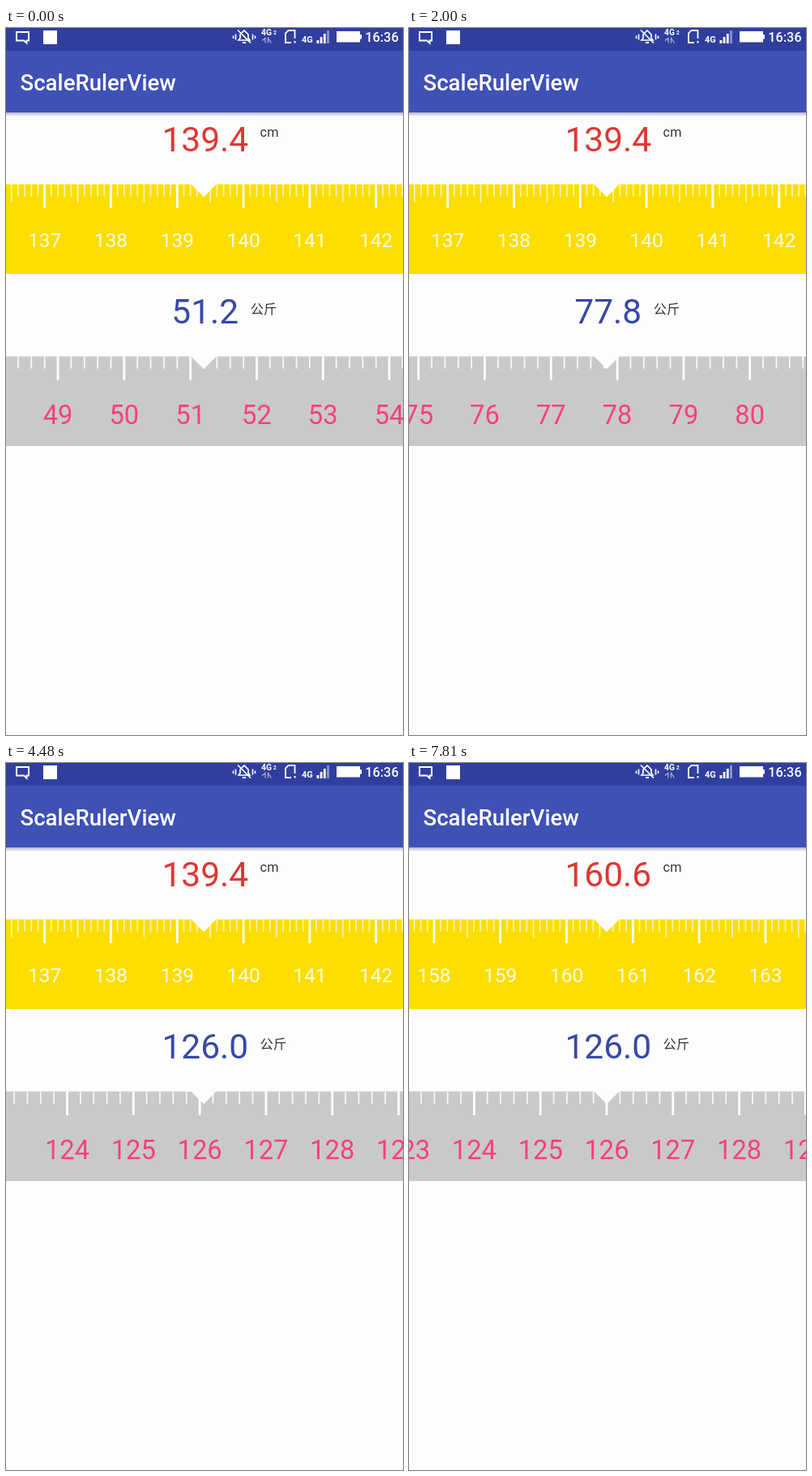
Recreate the animation shown at these times as an HTML page with a canvas. Size 490x871 px, loop 8.09 s.

```html
<!DOCTYPE html>
<html lang="en">
<head>
<meta charset="utf-8">
<title>Scale rulers</title>
<style>
html, body { margin: 0; width: 100%; height: 100%; overflow: hidden; background: #fdfdfd; }
canvas { display: block; width: 490px; height: 871px; }
</style>
</head>
<body>
<canvas id="stage" width="490" height="871"></canvas>
<script>
const ctx = document.getElementById('stage').getContext('2d');
const W = 490, H = 871, LOOP = 8090, REFRESH = 134;
const CENTER = 244, UNIT = 81.8, FLING = 650;
const FONT = 'Roboto, "Noto Sans CJK SC", "Noto Sans CJK", sans-serif';
const WHITE = '#fff', PAPER = '#fdfdfd';

// Flings are [start in ms, distance in units]
const heightRuler = {
  top: 192.6, fill: '#fbde00', tick: '#fef5b4', color: '#fffce0', size: 24.5, base: 269.6,
  parts: 10, mid: 5, valueColor: '#e03632', valueBase: 151.6, unit: 'cm', unitBase: 133.5,
  start: 139.4, flings: [[4640, 4.1], [4960, 17.105]]
};
const weightRuler = {
  top: 404.6, fill: '#c9c9c9', tick: '#f9f9f9', color: '#f8407c', size: 32.7, base: 488.2,
  parts: 5, mid: 0, valueColor: '#3848a6', valueBase: 363.7, unit: '公斤', unitBase: 352,
  start: 51.2, flings: [[300, 10.6], [560, 16.04], [1880, 16], [2790, 15.95], [3740, 16.27], [4750, -0.06]]
};

const clamp = p => Math.min(1, Math.max(0, p));
const easeOut = p => 1 - Math.pow(1 - clamp(p), 2.2);

function valueAt(t, r) {
  return r.flings.reduce((v, [begin, dist]) => v + dist * easeOut((t - begin) / FLING), r.start);
}

function rect(x, y, w, h, color) {
  ctx.fillStyle = color;
  ctx.fillRect(x, y, w, h);
}

function text(str, x, y, size, color, align = 'left', weight = 400) {
  ctx.font = `${weight} ${size}px ${FONT}`;
  ctx.textAlign = align;
  ctx.fillStyle = color;
  ctx.fillText(str, x, y);
}

function path(points, close) {
  ctx.beginPath();
  points.forEach(([x, y]) => ctx.lineTo(x, y));
  if (close) ctx.closePath();
}

function line(points, width, color = WHITE, close = false) {
  path(points, close);
  ctx.lineWidth = width;
  ctx.strokeStyle = color;
  ctx.stroke();
}

function fill(points, color) {
  path(points, true);
  ctx.fillStyle = color;
  ctx.fill();
}

function drawRuler(r, t) {
  const value = valueAt(t, r);
  rect(0, r.top, W, 110.4, r.fill);
  const first = Math.floor((value - CENTER / UNIT) * r.parts) - 1;
  const last = first + Math.ceil(W / UNIT * r.parts) + 3;
  for (let k = first; k <= last; k++) {
    const x = CENTER + (k / r.parts - value) * UNIT;
    const major = k % r.parts === 0;
    const len = major ? 29.4 : r.mid && k % r.mid === 0 ? 22 : 15;
    const w = major ? 2.8 : 1.7;
    rect(x - w / 2, r.top, w, len, major ? WHITE : r.tick);
    if (major && x > -3 && x < W + 1) text(k / r.parts, x, r.base, r.size, r.color, 'center');
  }
  fill([[CENTER - 16.5, r.top - 1], [CENTER + 16.5, r.top - 1], [CENTER, r.top + 15.7]], PAPER);

  const label = (Math.round(value * r.parts) / r.parts).toFixed(1);
  text(label, 245.75, r.valueBase, 42.5, r.valueColor, 'center');
  const end = 245.75 + ctx.measureText(label).width / 2;
  text(r.unit, end + 14.5, r.unitBase, 16.3, '#333');
}

function drawStatusBar() {
  rect(0, 0, W, 28, '#303f9f');

  line([[13, 5], [28, 5], [28, 15.5], [25.5, 15.5], [25.5, 18.5], [22, 15.5], [13, 15.5]], 2, WHITE, true);
  rect(46, 3, 17, 17, WHITE);

  // Muted bell
  line([[287, 15], [289, 12.5], [289, 8], [294, 3], [299, 8], [299, 12.5], [301, 15]], 1.7, WHITE, true);
  line([[286, 2.5], [302, 18.5]], 1.7);
  line([[292, 18], [296, 18]], 2);
  for (const side of [-1, 1]) {
    rect(293.2 + side * 10.5, 7.5, 1.6, 7, WHITE);
    rect(293.2 + side * 13.5, 9.5, 1.6, 3.5, WHITE);
  }

  // Network and data arrows
  text('4G', 315, 9, 10.3, WHITE, 'left', 700);
  text('2', 330, 8, 6.5, WHITE, 'left', 700);
  const dim = 'rgba(255,255,255,.6)';
  line([[316, 15.5], [320, 12.5], [320, 18.5]], 1.2, dim);
  line([[323.5, 18.5], [323.5, 12.5], [327.5, 18.5]], 1.2, dim);

  // SIM card, signal, battery
  line([[352, 18], [345, 18], [345, 6.5], [348.5, 3], [356.5, 3], [356.5, 13]], 1.8);
  rect(355.5, 16, 2, 2.5, WHITE);
  text('4G', 365, 18, 11, WHITE, 'left', 700);
  for (let i = 0; i < 4; i++) {
    const h = 4 + i * 4;
    rect(383.5 + i * 4.2, 19 - h, 2.8, h, i < 3 ? WHITE : 'rgba(255,255,255,.45)');
  }
  rect(408, 4, 29, 13.5, WHITE);
  rect(437, 8, 2, 5.5, WHITE);
  text('16:36', 443.3, 17, 16.3, WHITE, 'left', 500);
}

function drawToolbar() {
  const bottom = 104.3;
  rect(0, 28, W, bottom - 28, '#3f51b5');
  const shade = ctx.createLinearGradient(0, bottom, 0, bottom + 5);
  shade.addColorStop(0, '#b4b8d2');
  shade.addColorStop(1, PAPER);
  rect(0, bottom, W, 5, shade);
  text('ScaleRulerView', 17.5, 76.5, 27.6, WHITE, 'left', 500);
}

function drawPointer(t) {
  if (t < 390 || t > 1600) return;
  const y = Math.max(733, 777 - 0.055 * Math.abs(t - 550)) + 0.5;
  const shape = [[0, 0], [0, 15.5], [3.5, 12.5], [6, 18], [8.5, 17], [6.2, 11.5], [11, 11.5]];
  const points = shape.map(([dx, dy]) => [348.5 + dx, y + dy]);
  fill(points, WHITE);
  line(points, 1, '#222', true);
}

function draw(now) {
  // The screen is redrawn in even steps
  const t = Math.floor(now % LOOP / REFRESH) * REFRESH;
  rect(0, 0, W, H, PAPER);
  drawStatusBar();
  drawToolbar();
  drawRuler(heightRuler, t);
  drawRuler(weightRuler, t);
  drawPointer(t);
}

const begin = performance.now();
function loop() {
  draw(performance.now() - begin);
  requestAnimationFrame(loop);
}
loop();
</script>
</body>
</html>
```
